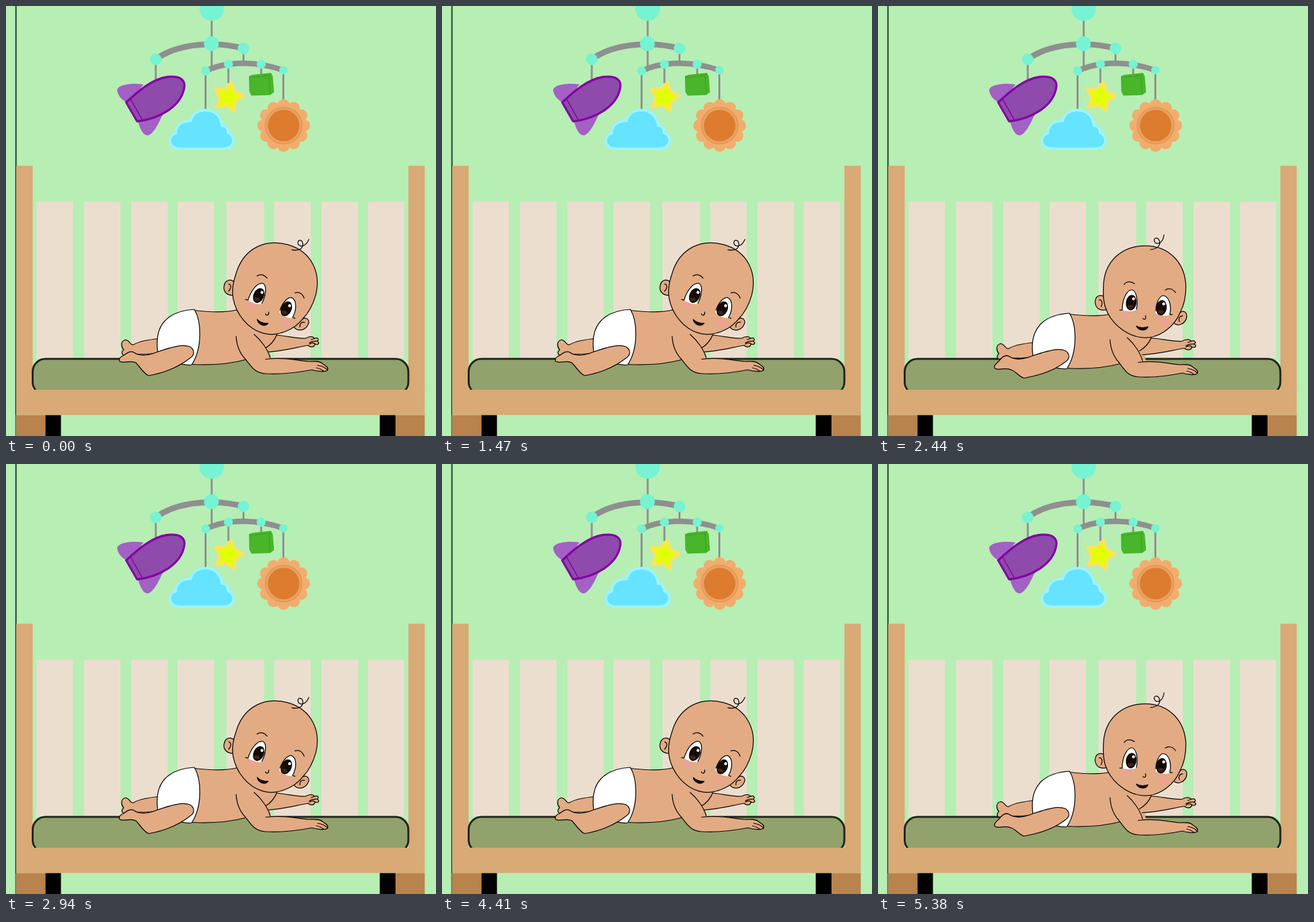
Write an HTML page that moves like this. It is 669 px wide and 669 px high and loops after 5.88 s.

```html
<!DOCTYPE html>
<html lang="en">
<head>
<meta charset="utf-8">
<title>Baby in a crib</title>
<style>
html, body { margin: 0; width: 100%; height: 100%; overflow: hidden; background: #b7eeb4; }
svg { display: block; width: 100vw; height: 100vh; }
.ink { fill: none; stroke: #000; stroke-width: 1.25; stroke-linecap: round; stroke-linejoin: round; }
.skin { fill: #e2ab84; }
</style>
</head>
<body>
<svg viewBox="0 0 669 669">
  <rect width="669" height="669" fill="#b7eeb4"/>
  <path d="M15.500 0V669" stroke="#365c40" stroke-width="2.500"/>

  <g id="mobile">
    <g fill="none" stroke="#8f8f8f">
      <path stroke-width="3" d="M320 15V98M233 83V114M369.500 66V90M310.500 101V164M346 90V120M397 90V108M431.500 100V150"/>
      <path stroke-width="9" d="M233 83Q264 60 320 59.500Q348 60 369 66"/>
      <path stroke-width="8.500" d="M311 101Q334 89.500 370 89Q405 90 431 100"/>
    </g>
    <g id="beads" fill="#75f3d2"></g>
    <g fill="#a361c3">
      <path d="M214 122C193 119 172 123 173 132C175 142 183 148 191 152Z"/>
      <path d="M205 178C209 194 215 203 222 201C232 196 240 178 246 163Z"/>
    </g>
    <path d="M187 150C205 133 227 114 250 110.500C268 108 279 113 277.500 126C273 156 240 175 204 179.500Z" fill="#8e4bab" stroke="#8200a2" stroke-width="3.300" stroke-linejoin="round"/>
    <path d="M194 145L212 177" stroke="#8200a2" stroke-width="1.500"/>
    <path d="M270 222C251 222 251 201 264 198C264 184 276 178 287 179C290 167 300 162 311 162C325 162 335 173 336 186C343 186 346 192 345 197C358 201 358 222 338 222Z" fill="#66e3ff" stroke="#9af4ff" stroke-width="4" stroke-linejoin="round"/>
    <path id="star" fill="#e3ff08" stroke="#ffe067" stroke-width="4" stroke-linejoin="round"/>
    <path d="M378 109L384 107L412 104L415 109L417 134L411 138.500L382 139.500L378.500 133Z" fill="#48b52a"/>
    <path d="M379 111L409 108L411 137M409 108L413 105" fill="none" stroke="#38a11e" stroke-width="1"/>
    <g id="petals" fill="#f2ad6c"></g>
    <circle cx="432" cy="186" r="34" fill="#f2ad6c"/>
    <circle cx="432" cy="186" r="28.500" fill="#eaa263" stroke="#dc9858" stroke-width="1.500"/>
    <circle cx="432" cy="186" r="24.500" fill="#dd7c2e"/>
  </g>

  <g id="slats" fill="#ecdecf"></g>
  <path d="M16 248.500H41.500V600H16ZM626 248.500H651.500V600H626Z" fill="#d9a976"/>
  <rect x="41.500" y="549" width="584.500" height="56" rx="20" fill="#91a26c" stroke="#20241b" stroke-width="3"/>
  <path d="M16 597H651.500V636.500H16Z" fill="#d9a976"/>
  <rect x="14" y="636.500" width="640" height="33" fill="#b7eeb4"/>
  <path d="M16 636.500H62V669H16ZM606 636.500H651.500V669H606Z" fill="#b8834d"/>
  <path d="M61.500 636.500H85.500V669H61.500ZM581.500 636.500H606V669H581.500Z"/>
  <path d="M15 636V669" stroke="#46704f" stroke-width="1.500"/>

  <g id="body">
    <path class="ink skin" d="M240 517C224 519 208 521 198 527C193 528 192 519 185 519.500C178 522 179 530 183 535C178 539 181 545 187 543C202 540 218 545 240 538Z"/>
    <path class="skin" d="M290 473C315 477 340 477 360 472L420 500L421 512L409 534L413 552L400 560L373 550C345 559 310 558 286 558Z"/>
    <path class="ink" d="M293 473.500C315 476 340 478 360 472.500M289 557.500C315 559 348 557 374 550"/>
    <path class="ink" style="fill:#fff" d="M293 472C304 490 306 532 289 558C284 559.500 278 558 272 557C254 556 240 550 236 538C233 516 237 501 247 490C258 478 276 473 293 472Z"/>
    <path class="ink skin" id="leg"/>
  </g>

  <g id="backArm">
    <path class="skin" d="M421 511C440 514 454 518 466 517L470 528C452 531 430 537 409 538L398 530Z"/>
    <path class="ink skin" d="M421 512C440 514 454 518 466 517C472 514 477 513 480 517C485 515 488 519 484 521.500C489 524 486 528 481 526C479 532 473 531 470 528C452 531 430 537 408 538"/>
    <path class="ink" d="M480 517L475 519M484 521.500C479 521 475 522 472 524M481 526C478 523 475 524 472 526"/>
    <path class="ink" d="M421 512C418 520 411 528 404 532"/>
  </g>

  <g id="frontArm">
    <path class="skin" d="M358 514C359 530 365 542 373 550C382 562 388 571 404 572C430 574 455 570 478 566L485 553C455 552 430 546 411 547C406 532 397 520 386 511Z"/>
    <path class="ink skin" d="M358 514C359 530 365 542 373 550C382 562 388 571 404 572C430 574 455 570 476 566C482 568 495 570 500 567C503 562 496 559 492 556C488 552 480 553 472 553C450 551 430 546 404 549.500"/>
    <path class="ink" d="M386 511C397 520 407 534 411 547M485 559C491 560 496 562 500 566M483 563C488 564 492 566 494 568"/>
  </g>

  <g id="head">
    <path class="ink skin" d="M354 453C345 447 337 452 338 462C339 472 348 475 357 472"/>
    <path class="ink" d="M344 457C349 457 350 463 347 468"/>
    <path class="ink skin" d="M468 479C475 471 482 477 480 485C478 494 468 499 461 494"/>
    <path class="ink" d="M474 482C469 482 467 487 469 491"/>
    <path class="ink skin" d="M416 373C455 373 478 402 479 436C479 452 476 466 470 477C462 497 440 516 416 516C392 516 368 499 357 477C350 462 350 449 351 431C354 397 379 373 416 373Z"/>
    <path class="ink" d="M424 379C433 378 440 374 438 366C436 359 428 360 430 366C432 372 443 371 445 356"/>
    <path class="ink" d="M383 433C387 428 394 428 399 432M447 442C452 438 459 440 463 446"/>
    <g fill="#f0a19a" opacity=".85">
      <ellipse cx="387" cy="480" rx="7.500" ry="4.800"/>
      <ellipse cx="446" cy="491.500" rx="7.500" ry="4.800"/>
    </g>
    <path fill="#fff" d="M380 473C380 456 387 442 395 441.500C402 443 405 459 402 473C395 476 386 475 380 473ZM432 478C432 463 437 451 444 450.500C453 452 457 467 454 481C446 483 438 482 432 478Z"/>
    <path class="ink" d="M376 473L380 473C380 456 387 442 395 441.500C402 443 405 458 402 472M432 474C433 461 438 451 444 450.500C453 452 457 466 454 480L458 480"/>
    <g fill="#140a06">
      <ellipse cx="394" cy="461.500" rx="8.300" ry="12" transform="rotate(8 394 461)"/>
      <ellipse cx="441" cy="469.500" rx="8.300" ry="12" transform="rotate(8 441 469)"/>
    </g>
    <g fill="#3d2416">
      <ellipse cx="393" cy="468" rx="4.500" ry="3"/>
      <ellipse cx="440" cy="476" rx="4.500" ry="3"/>
    </g>
    <g fill="#fff">
      <circle cx="397.500" cy="455.500" r="2.300"/>
      <circle cx="444.500" cy="463.500" r="2.300"/>
    </g>
    <path class="ink" d="M412 486C414 489 418 487 416 482"/>
    <path class="ink" style="fill:#1a0605" d="M402 498C407 501 414 501 420 499C417 506 406 506 402 498Z"/>
  </g>
</svg>
<script>
const $ = id => document.getElementById(id);
const NS = "http://www.w3.org/2000/svg";

function add(parent, tag, attrs) {
  const el = document.createElementNS(NS, tag);
  for (const key in attrs) el.setAttribute(key, attrs[key]);
  $(parent).append(el);
}

const polar = (cx, cy, r, deg) => {
  const a = deg * Math.PI / 180;
  return [cx + r * Math.cos(a), cy + r * Math.sin(a)];
};

[[320, 4, 19], [319.5, 58.5, 11.5], [233, 83, 9], [369.5, 66, 9],
 [310.5, 101, 7], [346, 90.5, 7], [397, 90.5, 7], [431.5, 100, 6.5]]
  .forEach(([cx, cy, r]) => add("beads", "circle", { cx, cy, r }));

[47.5, 121.5, 195, 267, 343, 417.5, 491, 563].forEach(x =>
  add("slats", "rect", { x, y: 304.5, width: x === 343 ? 58.5 : 56.5, height: 244 }));

for (let i = 0; i < 12; i++) {
  const [cx, cy] = polar(432, 186, 31.5, i * 30);
  add("petals", "circle", { cx, cy, r: 9.5 });
}

const tips = Array.from({ length: 10 }, (_, i) =>
  polar(345.5, 141.5, i % 2 ? 13.5 : 24, -77 + i * 36).join(" "));
$("star").setAttribute("d", "M" + tips.join("L") + "Z");

// Near leg; toe lowers the foot, heel moves the lowest point.
const leg = (toe, heel) =>
  `M236 538C252 533 272 525 286 530C294 535 294 543 286 548C268 562 245 ${571 + heel} 222 ${575 + heel}` +
  `C215 ${573 + heel} 209 562 202 ${555 + toe}C194 ${550 + toe} 185 ${557 + toe} 177 ${553 + toe}` +
  `C174 ${548 + toe} 180 ${545 + toe} 184 ${543 + toe / 2}C188 540 193 536 199 539C209 546 224 543 236 538Z`;

// Horizontal scale around a shoulder at (x, y), then a shift.
const stretch = (x, y, sx, dx, dy) =>
  `translate(${x + dx} ${y + dy}) scale(${sx} 1) translate(${-x} ${-y})`;

const poses = [
  { body: [0, 0], toe: 0, heel: 0, back: [1, 0, 0], front: [1, 0, 0], head: [16, -4.5, -7.5] },
  { body: [2, 6], toe: 2, heel: 0, back: [1.03, 2, 4], front: [0.98, 1.5, 5], head: [-10, -2, -4] },
  { body: [5, 6], toe: 5, heel: -2, back: [1.06, 4, 4.5], front: [0.955, 3, 5], head: [0, 0, 0] }
];

const LOOP = 5880;
const cuts = [0, 470, 970, 1470, 1940, 2440, 2940, 3410, 3910, 4410, 4880, 5380];

function draw(ms) {
  const t = ms % LOOP;
  const step = cuts.filter(c => c <= t).length - 1;
  const p = poses[step % 3];
  const move = (id, value) => $(id).setAttribute("transform", value);
  move("body", `translate(${p.body})`);
  move("backArm", stretch(421, 512, ...p.back));
  move("frontArm", stretch(358, 514, ...p.front));
  const [turn, dx, dy] = p.head;
  move("head", `translate(${dx} ${dy}) rotate(${turn} 408.5 473)`);
  $("leg").setAttribute("d", leg(p.toe, p.heel));
}

const start = performance.now();
function tick() {
  draw(performance.now() - start);
  requestAnimationFrame(tick);
}
tick();
</script>
</body>
</html>
```
